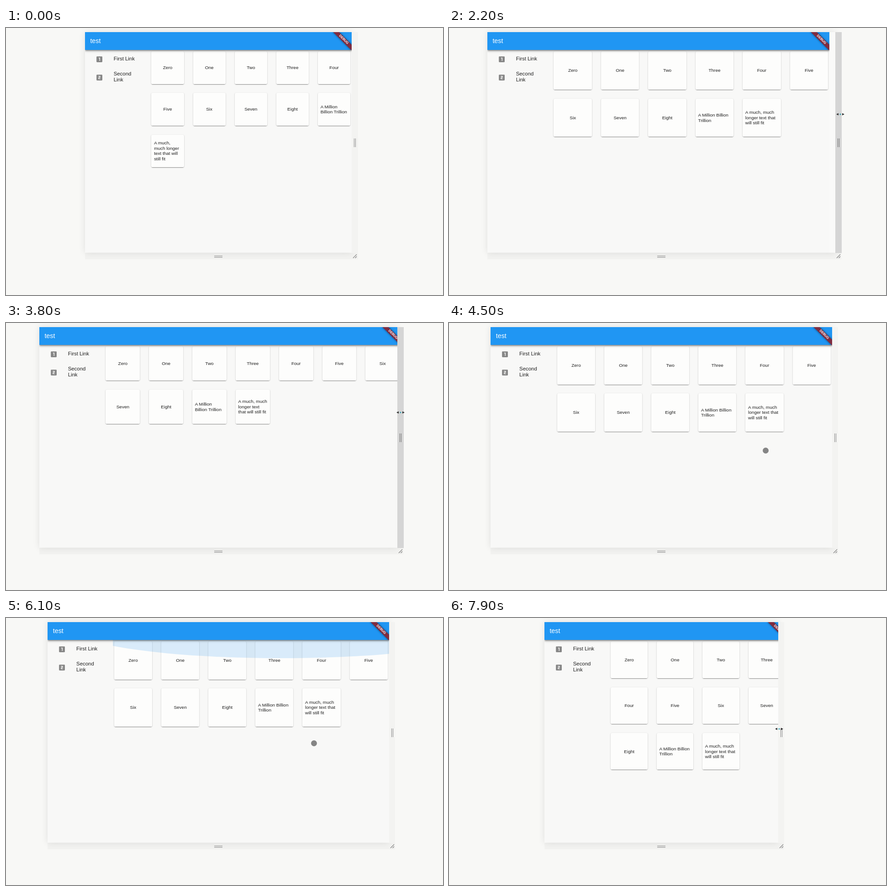
These frames come from a looping animation (957x585 px, 8 s). An HTML page:

```html
<!DOCTYPE html>
<html lang="en">
<head>
<meta charset="utf-8">
<title>Responsive grid</title>
<style>
:root { --s: .713px; }
html, body { margin: 0; width: 100%; height: 100%; overflow: hidden; background: #f8f8f6; }
body { position: relative; font-family: "Liberation Sans", Arial, sans-serif; color: #1f1f1f; }
body * { position: absolute; box-sizing: border-box; }
#view { top: 8.6px; height: 483.9px; overflow: hidden; background: #fafaf9; box-shadow: 0 0 14px rgba(0,0,0,.1); }
#app { left: 0; top: 0; height: 100%; background: #f8f8f7; overflow: hidden; }
.bar { z-index: 2; inset: 0 0 auto; height: 39.9px; background: #2096f3; color: #fff;
  font-size: calc(20 * var(--s)); line-height: 39.6px; padding-left: 11.4px;
  box-shadow: 0 1.4px 2.9px -.7px rgba(0,0,0,.3), 0 2.9px 3.6px rgba(0,0,0,.22), 0 .7px 7.1px rgba(0,0,0,.2); }
.debug { z-index: 3; right: -11.4px; top: 12.8px; width: 57px; height: 8.6px; transform: rotate(45deg);
  background: #7f2c40; box-shadow: 0 0 4.3px rgba(0,0,0,.6); color: #fff;
  font-size: 7.27px; font-weight: 700; line-height: 8.6px; text-align: center; }
.link { left: 62.7px; width: 56px; font-size: calc(16 * var(--s)); line-height: 13px; }
.icon { left: 22.8px; width: 17.1px; height: 17.1px; fill: #878787; }
#grid { left: 142.6px; right: 0; top: 39.9px; display: grid; gap: 14.26px; align-items: start; }
.card { position: relative; min-width: 0; min-height: 0; margin: 2.85px; aspect-ratio: 1; padding: 5.7px;
  display: flex; align-items: center; justify-content: center; border-radius: 2.85px; background: #fdfdfc;
  font-size: calc(14 * var(--s)); line-height: 11.4px;
  box-shadow: 0 1.4px .8px -.7px rgba(0,0,0,.28), 0 .7px .8px rgba(0,0,0,.18), 0 .7px 2.4px rgba(0,0,0,.22); }
.card span { position: static; }
#glow { left: 142.6px; right: 0; top: 39.9px; bottom: 0; overflow: hidden; }
#glow i { width: 906px; background: #2191e8; border-radius: 50%; }
#foot { top: 492.5px; height: 14px; background: #f2f2f0; }
#pane { top: 9px; width: 13.5px; height: 483.5px; background: #f3f3f1; }
#pane.hot { background: #d5d5d5; }
.grip { border: solid #858585; }
#pane .grip { left: 5px; top: 233px; width: 4px; height: 18.5px; border-width: 0 1px; }
#pane.hot .grip { border-color: #6c6c6c; }
#low { left: 456px; top: 498.5px; width: 18px; height: 4px; border-width: 1px 0; }
#corner { top: 495px; width: 10px; height: 10px; stroke: #7d7d7d; stroke-width: 1.1; }
#dot { left: -6.5px; top: -6.5px; width: 13px; height: 13px; border-radius: 50%; background: #858585; }
#arrows { left: -9px; top: -4px; width: 18px; height: 8px; }
</style>
</head>
<body>
<div id="foot"></div>
<div id="view">
  <div id="app">
    <div class="bar">test</div>
    <div class="debug">DEBUG</div>
    <svg class="icon" style="top:51.2px" viewBox="0 0 24 24"><path d="M19 3H5c-1.1 0-2 .9-2 2v14c0 1.1.9 2 2 2h14c1.1 0 2-.9 2-2V5c0-1.1-.9-2-2-2zm-5 14h-2V9h-2V7h4v10z"/></svg>
    <div class="link" style="top:52.4px">First Link</div>
    <svg class="icon" style="top:91px" viewBox="0 0 24 24"><path d="M19 3H5c-1.1 0-2 .9-2 2v14c0 1.1.9 2 2 2h14c1.1 0 2-.9 2-2V5c0-1.1-.9-2-2-2zm-4 8c0 1.11-.9 2-2 2h-2v2h4v2H9v-4c0-1.11.9-2 2-2h2V9H9V7h4c1.1 0 2 .89 2 2v2z"/></svg>
    <div class="link" style="top:85.9px">Second Link</div>
    <div id="grid"></div>
    <div id="glow"><i id="up"></i><i id="down"></i></div>
  </div>
</div>
<div id="pane"><div class="grip"></div></div>
<div id="low" class="grip"></div>
<svg id="corner" viewBox="0 0 10 10"><path d="M1 9L9 1M5.5 9L9 5.5"/></svg>
<div id="cursor">
  <div id="dot"></div>
  <svg id="arrows" viewBox="-9 -4 18 8"><path fill="#333" d="M-9 0l5-2.6v5.2zM9 0l-5-2.6v5.2z"/><circle r="1.6" fill="#35a3b5"/></svg>
</div>
<script>
const LOOP = 8000, STEP = 100, MID = 465, SIDE = 142.6, MAX_CELL = 103.5;
const LABELS = ['Zero', 'One', 'Two', 'Three', 'Four', 'Five', 'Six', 'Seven', 'Eight',
  'A Million Billion Trillion', 'A much, much longer text that will still fit'];

const el = id => document.getElementById(id);
const clamp = u => Math.min(1, Math.max(0, u));
const easeIn = p => u => u ** p;
const easeOut = p => u => 1 - (1 - u) ** p;
const px = (id, props) => {
  for (const k in props) el(id).style[k] = props[k] + 'px';
};

// Drags of the right edge, which starts at START
const START = 757;
const DRAGS = [
  { from: 900, to: 2800, by: 125, ease: easeOut(1.08) },
  { from: 2900, to: 4200, by: -43.4, ease: easeIn(1.5) },
  { from: 7200, to: 8000, by: -122, ease: easeOut(1.6) },
];
const edge = t => DRAGS.reduce((x, d) => x + d.by * d.ease(clamp((t - d.from) / (d.to - d.from))), START);
const widthAt = t => 2 * (edge(t) - MID);

// Pointer path: time, distance from the edge, height
const PATH = [[500, -32, 225], [700, 6, 208], [2200, 11, 188.5], [3200, 7, 183], [4200, 7, 205],
  [4500, -145.6, 279], [5400, -278, 315.5], [7100, -.6, 217], [7900, 2, 243]];

function pointer(t) {
  const n = Math.max(1, PATH.findIndex(p => p[0] >= t));
  const [a, b] = [PATH[n - 1], PATH[n]], u = clamp((t - a[0]) / (b[0] - a[0]));
  return [1, 2].map(i => a[i] + (b[i] - a[i]) * u);
}

for (const label of LABELS) {
  const card = document.createElement('div');
  card.className = 'card';
  card.appendChild(document.createElement('span')).textContent = label;
  el('grid').append(card);
}

// Overscroll glow: a flat ellipse that swells from one end of the grid and sinks back
function glow(id, side, age, mid) {
  const swell = Math.sin(Math.PI * clamp(age / 900));
  const depth = 40.5 * swell, height = depth * 3.24;
  px(id, { left: mid - 453, height, [side]: depth - height });
  el(id).style.opacity = .165 * swell;
}

function draw(t) {
  const width = widthAt(t), left = MID - width / 2, right = MID + width / 2;
  const appWidth = widthAt(t - STEP);  // the page repaints one step late
  const gridWidth = appWidth - SIDE;
  px('view', { left, width });
  px('app', { width: appWidth });
  px('foot', { left, width: width + 13.5 });
  px('pane', { left: right });
  px('corner', { left: right + 2 });
  el('grid').style.gridTemplateColumns = `repeat(${Math.ceil(gridWidth / MAX_CELL)}, minmax(0, 1fr))`;

  const [ahead, y] = pointer(t);
  const resizing = (t >= 700 && t < 4300) || t >= 7200;
  el('pane').className = t >= 500 && ahead > 3 ? 'hot' : '';
  px('cursor', { left: right + ahead, top: y });
  el('cursor').style.display = t < 500 ? 'none' : '';
  el('dot').style.display = resizing ? 'none' : '';
  el('arrows').style.display = resizing ? '' : 'none';

  glow('down', 'bottom', t - 4950, gridWidth * .61);
  glow('up', 'top', t - 5700, gridWidth * .61);
}

const start = performance.now();
function tick() {
  const t = (performance.now() - start) % LOOP;
  draw(Math.floor(t / STEP) * STEP);
  requestAnimationFrame(tick);
}
tick();
</script>
</body>
</html>
```
